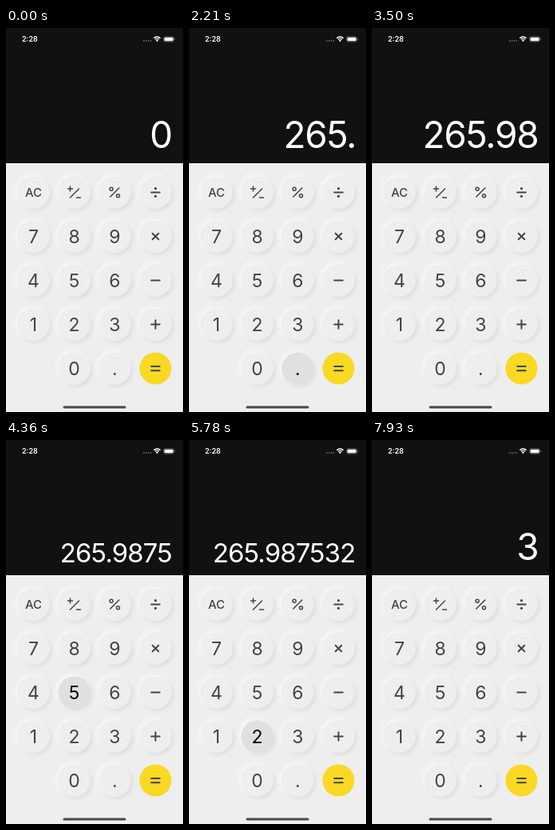
These frames come from a looping animation (222 px wide and 480 px high, 8 s). An HTML page with a canvas:

```html
<!DOCTYPE html>
<html lang="en">
<head>
<meta charset="utf-8">
<title>Calculator</title>
<style>
  html, body { margin: 0; width: 100%; height: 100%; overflow: hidden; background: #eee; }
  canvas { display: block; width: 222px; height: 480px; }
</style>
</head>
<body>
<canvas id="stage"></canvas>
<script>
const W = 222, H = 480, LOOP = 8000;
const FONT = 'Inter, Roboto, sans-serif';
const INK = '#444446';
const canvas = document.getElementById('stage');
const ctx = canvas.getContext('2d');
const dpr = window.devicePixelRatio || 1;
canvas.width = W * dpr;
canvas.height = H * dpr;

const COLS = [34.5, 85.5, 136.3, 187.5];
const ROWS = [205.5, 260.5, 315.5, 370.5, 425.5];
const LAYOUT = [
  ['AC', '±', '%', '÷'],
  ['7', '8', '9', '×'],
  ['4', '5', '6', '−'],
  ['1', '2', '3', '+'],
  ['', '0', '.', '=']
];

// Taps: key, time down, time up
const TAPS = [
  ['2', 500, 640], ['6', 930, 1210], ['5', 1500, 1640], ['.', 2210, 2360],
  ['9', 2780, 2930], ['8', 3210, 3500], ['7', 3780, 3930], ['5', 4360, 4640],
  ['3', 5210, 5360], ['2', 5780, 6070], ['AC', 6640, 6780], ['3', 7640, 7930]
];

function stateAt(t) {
  let value = '0', pressed = null;
  for (const [key, down, up] of TAPS) {
    if (t < down) break;
    if (key === 'AC') value = '0';
    else value = value === '0' ? key : value + key;
    if (t < up) pressed = key;
  }
  return { value, pressed };
}

function disc(x, y, r) {
  ctx.beginPath();
  ctx.arc(x, y, r, 0, Math.PI * 2);
  ctx.fill();
}

function pill(x, y, w, h, r) {
  ctx.beginPath();
  ctx.roundRect(x, y, w, h, r);
}

function lines(width, ...segments) {
  ctx.lineWidth = width;
  ctx.lineCap = 'round';
  ctx.beginPath();
  for (const [x1, y1, x2, y2] of segments) {
    ctx.moveTo(x1, y1);
    ctx.lineTo(x2, y2);
  }
  ctx.stroke();
}

function label(text, x, y, size, weight) {
  ctx.font = `${weight} ${size}px ${FONT}`;
  ctx.textAlign = 'center';
  ctx.fillText(text, x, y + size * 0.364);
}

// Operator glyphs, drawn around the key centre
const SIGNS = {
  '±'() {
    lines(1.5, [-8, -4.5, -2, -4.5], [-5, -7.5, -5, -1.5], [6, -4.5, -5, 6.5], [3, 6.5, 8, 6.5]);
  },
  '%'() {
    lines(1.5, [5.5, -5.5, -5.5, 5.5]);
    for (const s of [-1, 1]) {
      ctx.beginPath();
      ctx.arc(4.2 * s, 4.3 * s, 2, 0, Math.PI * 2);
      ctx.stroke();
    }
  },
  '÷'() {
    lines(2, [-5.3, 0, 5.3, 0]);
    disc(0, -4.8, 1.6);
    disc(0, 4.8, 1.6);
  },
  '×'() { lines(2, [-3.8, -3.8, 3.8, 3.8], [3.8, -3.8, -3.8, 3.8]); },
  '−'() { lines(2, [-5.3, 0, 5.3, 0]); },
  '+'() { lines(2, [-5.3, 0, 5.3, 0], [0, -5.3, 0, 5.3]); },
  '='() { lines(2, [-5.3, -2.5, 5.3, -2.5], [-5.3, 2.7, 5.3, 2.7]); }
};

function glow(color, offset, blur, x, y) {
  ctx.shadowColor = color;
  ctx.shadowOffsetX = ctx.shadowOffsetY = offset * dpr;
  ctx.shadowBlur = blur * dpr;
  disc(x, y, 20);
  ctx.shadowColor = 'transparent';
}

function drawKey(key, x, y, pressed) {
  if (key === '=') {
    ctx.fillStyle = '#f9d923';
    disc(x, y, 20);
  } else {
    ctx.fillStyle = pressed ? '#e0e0e0' : '#eeeeee';
    glow('#dcdcdc', 2.5, 5, x, y);
    glow('#f8f8f8', -2.5, 5, x, y);
    disc(x, y, 20);
  }
  ctx.fillStyle = ctx.strokeStyle = pressed ? '#000' : INK;
  if (SIGNS[key]) {
    ctx.save();
    ctx.translate(x, y);
    SIGNS[key]();
    ctx.restore();
  } else if (key === 'AC') {
    label(key, x, y, 15, 500);
  } else {
    label(key, x, y, 23, 400);
  }
}

function drawStatusBar() {
  ctx.fillStyle = ctx.strokeStyle = '#fff';
  ctx.font = `600 9px ${FONT}`;
  ctx.textAlign = 'left';
  ctx.fillText('2:28', 20, 17.2);

  ctx.fillStyle = '#666';
  for (let i = 0; i < 4; i++) disc(173 + i * 2.8, 16, 0.9);

  ctx.lineCap = 'butt';
  ctx.lineWidth = 1.3;
  for (const r of [3.7, 6]) {
    ctx.beginPath();
    ctx.arc(189.5, 17, r, -Math.PI * 0.75, -Math.PI * 0.25);
    ctx.stroke();
  }
  ctx.fillStyle = '#fff';
  ctx.beginPath();
  ctx.moveTo(189.5, 17.2);
  ctx.arc(189.5, 17.2, 2.2, -Math.PI * 0.75, -Math.PI * 0.25);
  ctx.fill();

  ctx.strokeStyle = '#777';
  ctx.lineWidth = 0.7;
  pill(197.6, 10.8, 13, 6.4, 2);
  ctx.stroke();
  ctx.fillStyle = '#fff';
  pill(198.6, 11.8, 11, 4.4, 1.2);
  ctx.fill();
  ctx.fillStyle = '#777';
  pill(211.3, 13, 0.9, 2, 0.4);
  ctx.fill();
}

function drawValue(value) {
  const small = value.replace('.', '').length > 6;
  const size = small ? 33 : 46;
  ctx.fillStyle = '#fff';
  ctx.textAlign = 'left';
  ctx.font = `400 ${size}px ${FONT}`;
  ctx.letterSpacing = `${-0.028 * size}px`;
  const right = ctx.measureText(value).actualBoundingBoxRight;
  ctx.fillText(value, 207.2 - right, small ? 152.6 : 149.8);
  ctx.letterSpacing = '0px';
}

function draw(t) {
  const { value, pressed } = stateAt(t);
  ctx.setTransform(dpr, 0, 0, dpr, 0, 0);
  ctx.fillStyle = '#eeeeee';
  ctx.fillRect(0, 0, W, H);
  ctx.fillStyle = '#111111';
  ctx.fillRect(0, 0, W, 169);

  drawStatusBar();
  drawValue(value);

  LAYOUT.forEach((row, r) => row.forEach((key, c) => {
    if (key) drawKey(key, COLS[c], ROWS[r], key === pressed);
  }));

  ctx.fillStyle = '#484848';
  pill(71.5, 472.4, 79, 3, 1.5);
  ctx.fill();
}

const start = performance.now();
function tick() {
  draw((performance.now() - start) % LOOP);
  requestAnimationFrame(tick);
}
tick();
</script>
</body>
</html>
```
